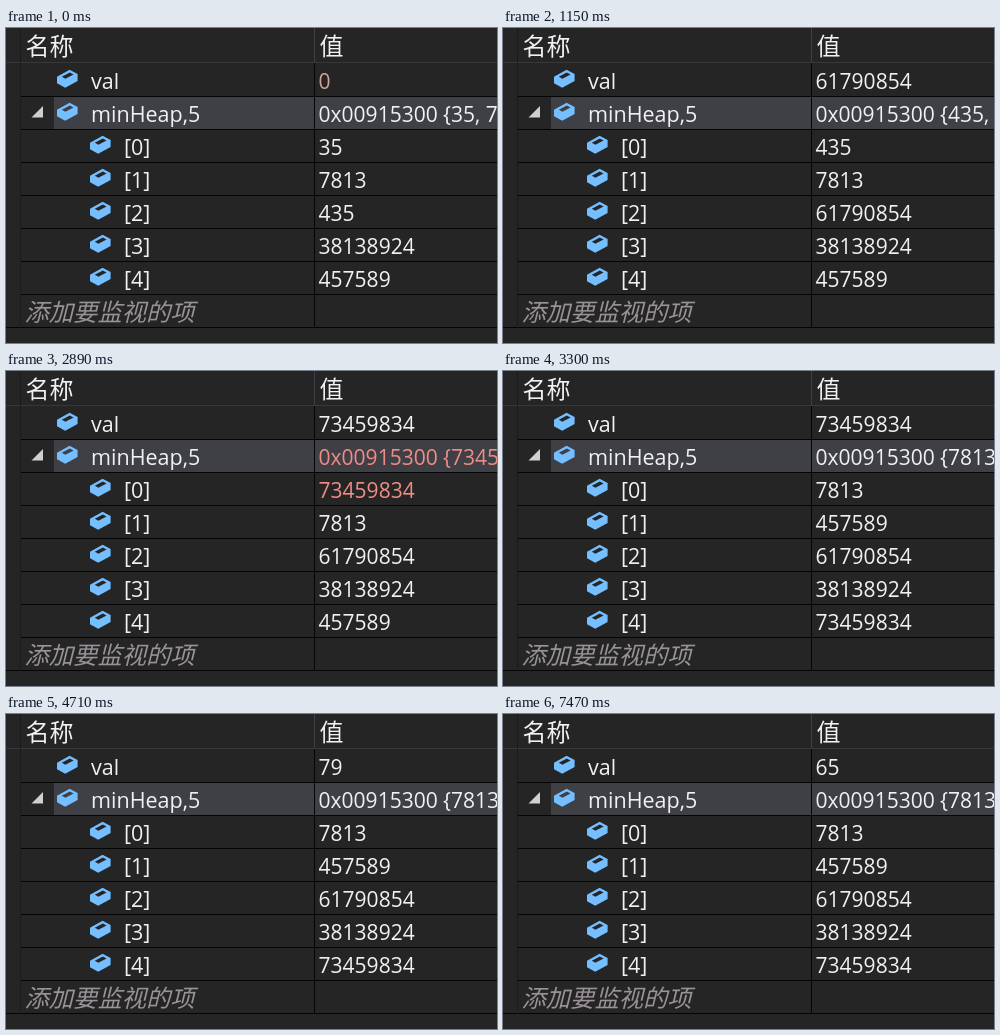
An HTML page that plays this animation: 491 px wide and 315 px high, repeating every 8 s.

```html
<!DOCTYPE html>
<html lang="zh">
<head>
<meta charset="utf-8">
<title>Watch window</title>
<style>
html, body { margin: 0; width: 100%; height: 100%; overflow: hidden; background: #252526; }
svg { display: block; width: 491px; height: 315px; }
text { font: 21px "Open Sans", "Noto Sans", sans-serif; fill: #f1f1f1; white-space: pre; }
.name { font-size: 21.5px; }
.cjk { font: 24px "Noto Sans CJK SC", "Noto Sans CJK", sans-serif; }
.hint { font-size: 24.3px; font-style: italic; fill: #999297; }
</style>
</head>
<body>
<svg id="stage" viewBox="0 0 491 315"></svg>
<script>
const stage = document.getElementById('stage');
const LOOP = 8000, PITCH = 33;
const WHITE = '#f1f1f1', RED = '#f08c88';
const BACK = '#252526', SELECTED = '#3f3f46', LINE = '#050505';

function add(tag, attrs, content) {
  const el = document.createElementNS('http://www.w3.org/2000/svg', tag);
  for (const k in attrs) el.setAttribute(k, attrs[k]);
  if (content) el.textContent = content;
  stage.appendChild(el);
  return el;
}
const rect = (x, y, width, height, fill) => add('rect', { x, y, width, height, fill });
const label = (x, y, s, cls = '') => add('text', { x, y, class: cls }, s);

function cube(x, y, hole) {
  const transform = `translate(${x} ${y})`;
  add('path', { transform, fill: '#75beff', d: 'M0 7.2 12.6.3 20.6 4.6V11.4L8.2 18.2 0 13.8Z' });
  add('path', { transform, fill: hole, d: 'M4.8 7.2 12.8 3 16.6 5.1 8.4 9.3Z' });
}

// Grid
rect(0, 0, 491, 315, BACK);
rect(48, 69, 443, 32, SELECTED);
rect(0, 34, 491, 1, '#38383c');
for (let i = 1; i < 8; i++) rect(15, 35 + PITCH * i, 476, 1, LINE);
rect(0, 299, 491, 1, LINE);
rect(14, 0, 1, 300, '#1b1b1c');
rect(308, 0, 1, 35, SELECTED);
rect(308, 35, 1, 265, LINE);

// Names
label(19.5, 26.5, '名称', 'cjk');
label(313.5, 26.5, '值', 'cjk');
label(18.5, 292.5, '添加要监视的项', 'cjk hint');
add('path', { d: 'M37 78V89.5H25.5Z', fill: '#d0d0d0' });

const names = ['val', 'minHeap,5', '[0]', '[1]', '[2]', '[3]', '[4]'];
const cells = names.map((name, i) => {
  const y = 60.5 + PITCH * i, sub = i > 1;
  cube(sub ? 84 : 51, 41.5 + PITCH * i, i === 1 ? SELECTED : BACK);
  label(sub ? 118 : 85, y, name, 'name');
  return label(312.6, y, '');
});

// Each step: start, val, heap, rows just changed, highlight colour
const first = [35, 7813, 435, 38138924, 457589];
const second = [435, 7813, 61790854, 38138924, 457589];
const third = [7813, 457589, 61790854, 38138924, 73459834];
const withRoot = (heap, root) => [root, ...heap.slice(1)];
const steps = [
  [0, 0, first, [0], '#cda596'],
  [60, 61790854, first, [0]],
  [340, 61790854, first],
  [680, 61790854, withRoot(first, 61790854), [1, 2]],
  [930, 61790854, second, [1, 2, 4]],
  [1150, 61790854, second],
  [1430, 64, second, [0]],
  [1680, 64, second],
  [2420, 73459834, second, [0]],
  [2670, 73459834, second],
  [2890, 73459834, withRoot(second, 73459834), [1, 2]],
  [3080, 73459834, third, [1, 2, 3, 6]],
  [3300, 73459834, third],
  [3550, 46, third, [0]],
  [4020, 46, third],
  [4550, 79, third, [0]],
  [4710, 79, third],
  [5360, 54, third, [0]],
  [5700, 54, third],
  [6410, 679, third, [0], '#dfa0a2'],
  [6600, 679, third],
  [7220, 65, third, [0]],
  [7470, 65, third]
];

let shown;
function draw(t) {
  const step = steps.filter(s => s[0] <= t).pop();
  if (step === shown) return;
  shown = step;
  const [, val, heap, changed = [], tint = RED] = step;
  const values = [val, `0x00915300 {${heap.join(', ')}}`, ...heap];
  cells.forEach((cell, i) => {
    cell.textContent = values[i];
    cell.style.fill = changed.includes(i) ? tint : WHITE;
  });
}

const start = performance.now();
function tick() {
  draw((performance.now() - start) % LOOP);
  requestAnimationFrame(tick);
}
tick();
</script>
</body>
</html>
```
